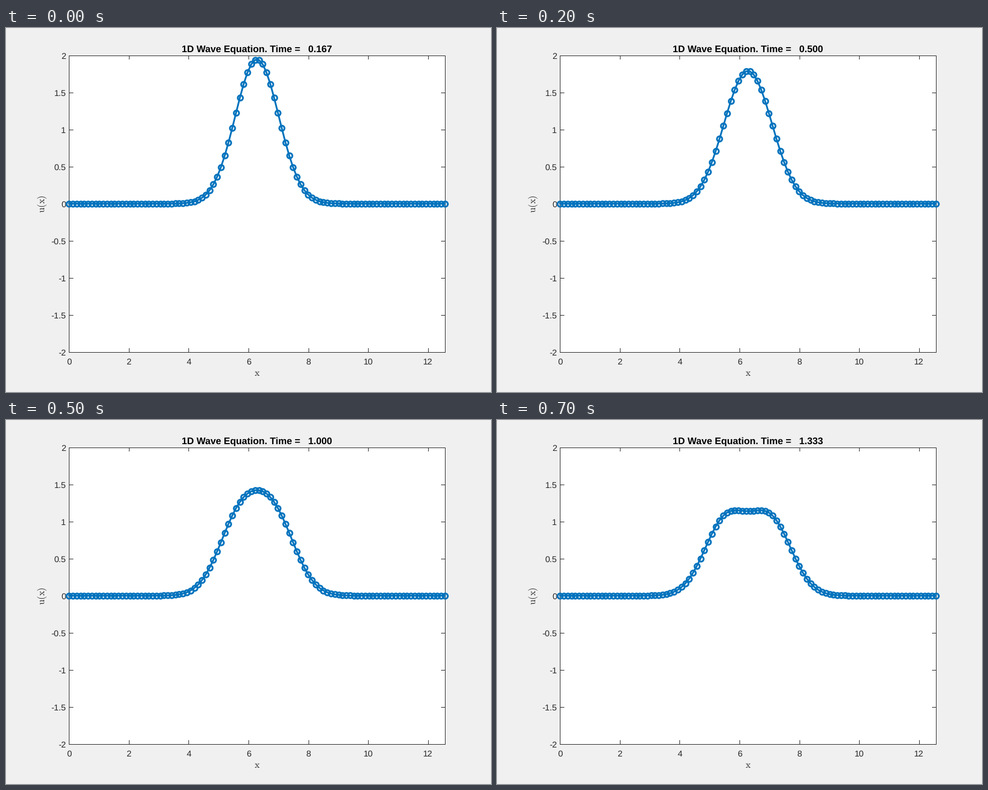
A matplotlib script that plays this animation: 864x648 px, repeating every 800 ms.

```python
import numpy as np
import matplotlib.pyplot as plt
from matplotlib.animation import FuncAnimation
from matplotlib.patches import Arc, Circle, Rectangle, RegularPolygon

plt.rcParams.update({
    "font.family": "Liberation Sans",
    "mathtext.fontset": "cm",
    "text.hinting": "none",
    "toolbar": "None",
})

W, H = 864, 648
LEFT, RIGHT = 0.13 * W, 0.905 * W
TOP, BOTTOM = 0.075 * H, 0.89 * H
SCALE = W / 560  # pixels per typographic point
LENGTH = 4 * np.pi
FRAMES, DT, SPEED = 8, 1 / 6, 0.5
TOOLBAR_FRAME = 1
BACK, INK, BLUE, GRAY = "#f0f0f0", "#262626", "#0072bd", "#858585"

# At 72 dpi one matplotlib point equals one pixel.
fig = plt.figure(figsize=(W / 72, H / 72), dpi=72, facecolor=BACK)
ax = fig.add_axes([0, 0, 1, 1])
ax.set_xlim(0, W)
ax.set_ylim(H, 0)
ax.axis("off")


def px(x):
    return LEFT + (RIGHT - LEFT) * x / LENGTH


def py(u):
    return (TOP + BOTTOM) / 2 - (BOTTOM - TOP) * u / 4


def label(x, y, text, points=10, color=INK, ha="center", **kw):
    return ax.text(x, y, text, size=points * SCALE, color=color, ha=ha, **kw)


def draw_axes():
    ax.add_patch(Rectangle((LEFT, TOP), RIGHT - LEFT, BOTTOM - TOP,
                           fc="white", ec=INK, lw=1, zorder=1))
    tick = 0.01 * (RIGHT - LEFT)
    for value in range(0, 13, 2):
        for edge, inward in ((BOTTOM, -tick), (TOP, tick)):
            ax.plot([px(value)] * 2, [edge, edge + inward], color=INK, lw=1)
        label(px(value), BOTTOM + 22, f"{value}")
    for value in np.arange(-2, 2.1, 0.5):
        for edge, inward in ((LEFT, tick), (RIGHT, -tick)):
            ax.plot([edge, edge + inward], [py(value)] * 2, color=INK, lw=1)
        label(LEFT - 5.6, py(value) + 6, f"{value:g}", ha="right")
    label((LEFT + RIGHT) / 2, BOTTOM + 42, r"$\mathrm{x}$", 11)
    label(64.5, py(0), r"$\mathrm{u(x)}$", 11, rotation=90, va="center")


def draw_toolbar():
    parts = []
    y = 32
    share, brush, tip, hand, zoom_in, zoom_out, home = 581 + 31 * np.arange(7)

    def patch(shape, fill="none", width=2):
        shape.set(fc=fill, ec=GRAY, lw=width, zorder=9)
        parts.append(ax.add_patch(shape))

    def line(x0, y0, x1, y1, width=2, color=GRAY):
        parts.extend(ax.plot([x0, x1], [y0, y1], color=color, lw=width,
                             zorder=9, solid_capstyle="round"))

    patch(Rectangle((566, 17), 214, 30), BACK, 0)

    # Export
    patch(Arc((share + 3, y + 4), 18, 18, theta1=180, theta2=270))
    for side in (-1, 1):
        line(share + 3, y - 5 + 5 * side, share + 8, y - 5)
    line(share - 11, y + 9, share + 5, y + 9)
    line(share - 11, y + 9, share - 7, y + 1)
    patch(RegularPolygon((share + 10, y + 8), 3, radius=4), GRAY, 0)

    # Brush
    patch(Rectangle((brush + 2, y - 12), 3, 13))
    patch(Rectangle((brush - 2, y + 1), 11, 4))
    patch(RegularPolygon((brush + 3, y + 8), 3, radius=9,
                         orientation=np.pi), GRAY, 0)

    # Data tip
    patch(Rectangle((tip - 8, y - 11), 20, 23))
    for dy in (-4, 4):
        line(tip - 3, y + dy, tip + 7, y + dy)

    # Hand: wide strokes with a narrower light core leave an outline
    for width, color in ((6, GRAY), (2.4, BACK)):
        for k, angle in enumerate(np.radians([-50, -20, -5, 10, 28])):
            reach = 12 + 3 * np.sin(np.pi * k / 4)
            line(hand + 1, y + 5, hand + 1 + reach * np.sin(angle),
                 y + 5 - reach * np.cos(angle), width, color)
        line(hand, y + 7, hand + 3, y + 7, width + 5, color)

    # Zoom in and out
    for cx in (zoom_in, zoom_out):
        patch(Circle((cx - 2, y - 2), 9))
        line(cx + 5, y + 5, cx + 11, y + 11, 3)
        line(cx - 7, y - 2, cx + 3, y - 2)
    line(zoom_in - 2, y - 7, zoom_in - 2, y + 3)

    # Home
    for side in (-1, 1):
        line(home, y - 11, home + 12 * side, y + 1)
        line(home + 9 * side, y, home + 9 * side, y + 12)
        line(home + 3 * side, y + 4, home + 3 * side, y + 12)
        line(home + 9 * side, y + 12, home + 3 * side, y + 12)
    line(home - 3, y + 4, home + 3, y + 4)
    line(home + 7, y - 11, home + 7, y - 5)
    return parts


def wave(x, t):
    offset, shift = x - LENGTH / 2, SPEED * t
    return np.exp(-(offset - shift) ** 2) + np.exp(-(offset + shift) ** 2)


draw_axes()
title = label((LEFT + RIGHT) / 2, 42.5, "", 11, "black", weight="bold")
toolbar = draw_toolbar()

grid = np.linspace(0, LENGTH, 100)
curve, = ax.plot(px(grid), py(0 * grid), "-o", color=BLUE, lw=2 * SCALE,
                 ms=6 * SCALE, mfc="none", mew=2 * SCALE, zorder=5)


def update(i):
    t = (i + 1) * DT
    # The plotted solution is one step ahead of the displayed time.
    curve.set_ydata(py(wave(grid, t + DT)))
    title.set_text(f"1D Wave Equation. Time =   {t:.3f}")
    for part in toolbar:
        part.set_visible(i == TOOLBAR_FRAME)
    return [curve, title, *toolbar]


anim = FuncAnimation(fig, update, frames=FRAMES, interval=100,
                     init_func=lambda: update(0), repeat=True,
                     repeat_delay=0, blit=False)
plt.show()
```
